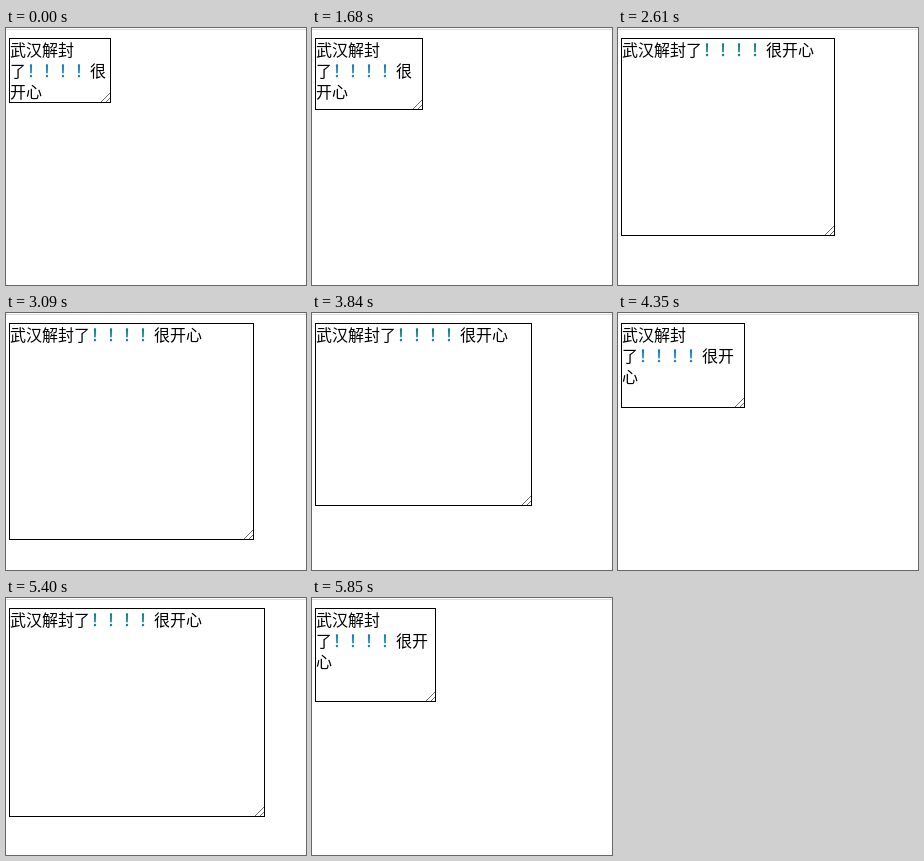
Animation of 300 by 257 pixels, one loop 7230 ms. Source, as an HTML page:

```html
<!DOCTYPE html>
<html lang="zh-CN">
<head>
<meta charset="utf-8">
<style>
html, body { margin: 0; width: 100%; height: 100%; overflow: hidden; background: #fff; }
body::before { content: ""; position: absolute; top: 1px; left: 0; width: 100%; height: 1px; background: #dcdcdc; }
#box {
  position: absolute; left: 3px; top: 10px; box-sizing: border-box;
  border: 1px solid #000; overflow: hidden; color: #000;
  font: 16px/21px "Noto Sans CJK SC", "Noto Sans CJK", sans-serif;
  text-spacing-trim: space-all;
}
#marks { position: relative; left: 1px; -webkit-text-stroke: .4px; }
#box svg { position: absolute; right: 0; bottom: 0; }
</style>
</head>
<body>
<div id="box">武汉解封了<span id="marks">！！！！</span>很开心<svg width="11" height="11" fill="none" stroke="#6b6b6b"><path d="M2 11l9-9M7 11l4-4"/></svg></div>
<script>
const LOOP = 7230, TICK = 30;
const box = document.getElementById("box");
const marks = document.getElementById("marks");

// Each drag moves the corner to a new place; it rests in between.
const first = { x: 105, y: 75 };
const drags = [
  { from: 1650, to: 2130, x: 195, y: 186 },
  { from: 2340, to: 2610, x: 217, y: 208 },
  { from: 2610, to: 3090, x: 248, y: 227 },
  { from: 3120, to: 3360, x: 258, y: 234 },
  { from: 3630, to: 4350, x: 127, y: 95 },
  { from: 4410, to: 4530, x: 119, y: 88 },
  { from: 4800, to: 5340, x: 261, y: 223 },
  { from: 5340, to: 5400, x: 259, y: 219 },
  { from: 5400, to: 5850, x: 124, y: 104 }
];

function corner(t) {
  let { x, y } = first;
  for (const d of drags) {
    const p = Math.min(1, Math.max(0, (t - d.from) / (d.to - d.from)));
    x += (d.x - x) * p;
    y += (d.y - y) * p;
  }
  return [Math.round(x), Math.round(y)];
}

function draw(now) {
  const t = Math.floor(now % LOOP / TICK) * TICK;
  const [right, bottom] = corner(t);
  box.style.width = right - 3 + "px";
  box.style.height = bottom - 10 + "px";
  marks.style.color = right < 149 ? "#007ab8" : "#007878";
}

let start;
function frame(now) {
  start ??= now;
  draw(now - start);
  requestAnimationFrame(frame);
}
draw(0);
requestAnimationFrame(frame);
</script>
</body>
</html>
```
